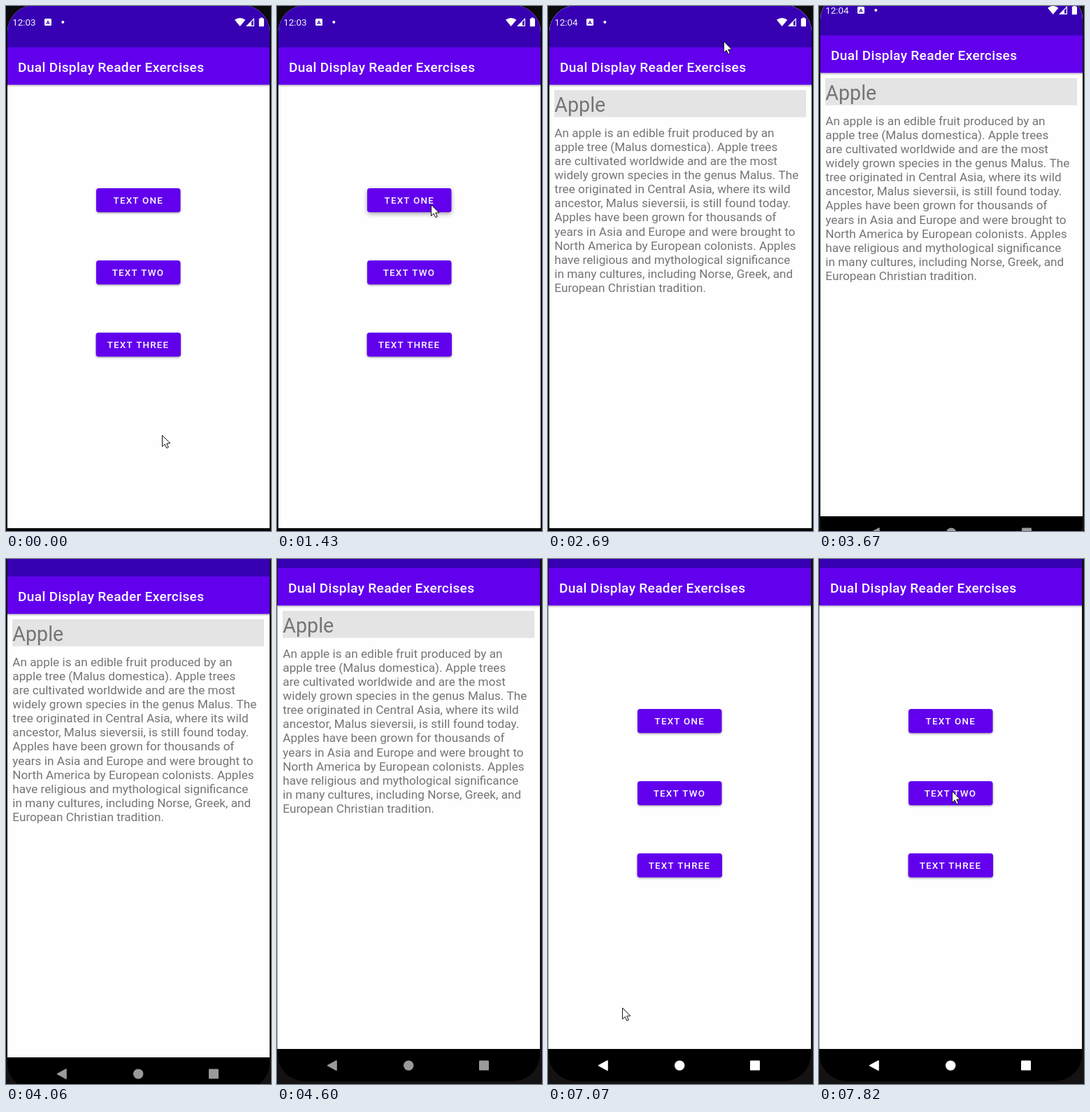
Write an HTML page with a canvas that moves like this. It is 379x749 px and loops after 8000 ms.

```html
<!DOCTYPE html>
<html lang="en">
<head>
<meta charset="utf-8">
<title>Two screens</title>
<style>
  html, body { margin: 0; width: 100%; height: 100%; overflow: hidden; background: #0b0a0c; }
  canvas { display: block; width: 379px; height: 749px; }
</style>
</head>
<body>
<canvas id="stage"></canvas>
<script>
const W = 379, H = 749, LOOP = 8000;
const canvas = document.getElementById('stage');
const dpr = window.devicePixelRatio || 1;
canvas.width = W * dpr;
canvas.height = H * dpr;
const ctx = canvas.getContext('2d');

const PURPLE = '#6200ee', DARK = '#3700b3', PAPER = '#fefefe', GREY = '#757575';
const SCREEN = { x: 2, y: -1, w: 375, h: 792, r: 38 };
const TITLE = 'Dual Display Reader Exercises';
const ARTICLE = [
  'An apple is an edible fruit produced by an',
  'apple tree (Malus domestica). Apple trees',
  'are cultivated worldwide and are the most',
  'widely grown species in the genus Malus. The',
  'tree originated in Central Asia, where its wild',
  'ancestor, Malus sieversii, is still found today.',
  'Apples have been grown for thousands of',
  'years in Asia and Europe and were brought to',
  'North America by European colonists. Apples',
  'have religious and mythological significance',
  'in many cultures, including Norse, Greek, and',
  'European Christian tradition.'
];
const BUTTONS = [
  { label: 'TEXT ONE', x: 129, y: 260, w: 120.5, textX: 153.6 },
  { label: 'TEXT TWO', x: 129, y: 363, w: 120.5, textX: 151.8 },
  { label: 'TEXT THREE', x: 128.6, y: 466, w: 121.4, textX: 144.8 }
];

// Each track holds [time, ...values]; values stay until the next entry.
const POINTER = [
  [0, 223, 612], [270, 218, 555], [400, 210, 420], [530, 214, 315], [660, 220, 283],
  [2280, 223, 262], [2410, 230, 205], [2540, 241, 125], [2690, 251, 50], [2810, 257, 8],
  [2930, -50, -50],
  [4880, 170, 738], [5010, 212, 610], [5140, 222, 504], [5270, 192, 560],
  [5400, 138, 655], [5530, 102, 715], [5660, 91, 731],
  [6920, 94, 712], [7070, 106, 640], [7220, 130, 530], [7370, 156, 420],
  [7520, 175, 345], [7670, 185, 311], [7820, 190, 331]
];
const SHIFT = [
  [0, 0, 0], [3380, 0, -4], [3516, 0, -10], [3652, 0, -17], [3788, 0, -24],
  [3924, 0, -30], [4060, 0, -34], [4330, 0, -38], [4465, -1, -43], [4600, -1, -46]
];
// opacity and scale of the article page
const PAGE = [
  [0, 0, 1], [2020, 0.5, 0.94], [2150, 1, 0.99], [2280, 1, 1],
  [6770, 0.6, 0.97], [6920, 0.15, 0.93], [7070, 0, 1]
];
// radius and opacity of the touch highlight, then button lift
const PRESS = [[0, 0, 0, 0], [1190, 45, 0.22, 0.5], [1310, 110, 0.14, 1], [1430, 0, 0, 1], [2280, 0, 0, 0]];
const NAV_TAP = [[0, 0], [6070, 0.2], [6270, 0.1], [6470, 0]];

function at(track, t) {
  let found = track[0];
  for (const key of track) if (key[0] <= t) found = key;
  return found.slice(1);
}

function rect(x, y, w, h, color) {
  ctx.fillStyle = color;
  ctx.fillRect(x, y, w, h);
}

function round(x, y, w, h, r) {
  ctx.beginPath();
  ctx.roundRect(x, y, w, h, r);
}

function poly(points, color) {
  ctx.beginPath();
  points.forEach(([x, y]) => ctx.lineTo(x, y));
  ctx.closePath();
  ctx.fillStyle = color;
  ctx.fill();
}

function disc(x, y, r, color) {
  ctx.beginPath();
  ctx.arc(x, y, r, 0, Math.PI * 2);
  ctx.fillStyle = color;
  ctx.fill();
}

function text(str, x, y, size, color, weight = 400, spacing = 0) {
  ctx.font = `${weight} ${size}px Roboto, sans-serif`;
  ctx.letterSpacing = spacing + 'px';
  ctx.fillStyle = color;
  ctx.fillText(str, x, y);
}

function drawBars() {
  rect(2, -1, 375, 747, PAPER);
  const shade = ctx.createLinearGradient(0, 112, 0, 116);
  shade.addColorStop(0, 'rgba(0,0,0,.26)');
  shade.addColorStop(1, 'rgba(0,0,0,0)');
  rect(2, 112, 375, 4, shade);
  rect(2, -1, 375, 60, DARK);
  rect(2, 59, 375, 53.4, PURPLE);
  text(TITLE, 17, 93.6, 19.1, '#fff', 500, 0.32);
}

function drawButton(b, press) {
  const [radius, alpha, lift] = press;
  ctx.save();
  ctx.shadowColor = 'rgba(0,0,0,.36)';
  ctx.shadowBlur = (3 + 3 * lift) * dpr;
  ctx.shadowOffsetY = (1.3 + lift) * dpr;
  round(b.x, b.y, b.w, 34.3, 3.8);
  ctx.fillStyle = PURPLE;
  ctx.fill();
  ctx.restore();
  if (alpha) {
    ctx.save();
    round(b.x, b.y, b.w, 34.3, 3.8);
    ctx.clip();
    disc(220, 283, radius, `rgba(255,255,255,${alpha})`);
    ctx.restore();
  }
  text(b.label, b.textX, b.y + 22, 13.37, '#fff', 500, 1.19);
}

function drawHome(t) {
  drawBars();
  BUTTONS.forEach((b, i) => drawButton(b, i ? [0, 0, 0] : at(PRESS, t)));
}

function drawArticle() {
  drawBars();
  rect(9, 120, 360, 38.6, '#e4e4e4');
  text('Apple', 9.3, 150.6, 28.65, GREY);
  ARTICLE.forEach((line, i) => text(line, 9.3, 186.6 + i * 20.14, 17.19, GREY));
}

function drawStatus(t) {
  text(t < 2280 ? '12:03' : '12:04', 9.3, 28.2, 13.4, '#f4f0fb');
  round(55, 18, 10, 10, 1.5);
  ctx.fillStyle = '#fff';
  ctx.fill();
  text('A', 57.2, 26, 8, DARK, 700);
  disc(81.3, 23, 2, '#fff');

  ctx.beginPath();
  ctx.moveTo(334.7, 29);
  ctx.lineTo(327, 19.8);
  ctx.quadraticCurveTo(334.7, 14, 342.4, 19.8);
  ctx.closePath();
  ctx.fillStyle = '#fff';
  ctx.fill();

  poly([[343, 29], [355, 29], [355, 17]], '#fff');
  poly([[351, 27.8], [351, 22.8], [353.8, 20], [353.8, 27.8]], DARK);

  rect(363.7, 16.6, 3.4, 2, '#fff');
  round(361.8, 17.8, 7.2, 11.4, 1);
  ctx.fillStyle = '#fff';
  ctx.fill();
}

function drawNav(t) {
  const color = t < 6070 ? '#9a9a9a' : '#fff';
  rect(2, 745, 375, 47, '#000');
  const [tap] = at(NAV_TAP, t);
  if (tap) {
    ctx.beginPath();
    ctx.ellipse(80, 768.5, 33, 23, 0, 0, Math.PI * 2);
    ctx.fillStyle = `rgba(255,255,255,${tap})`;
    ctx.fill();
  }
  poly([[73.5, 768.6], [86, 762], [86, 775.2]], color);
  ctx.strokeStyle = color;
  ctx.lineWidth = 1.6;
  ctx.lineJoin = 'round';
  ctx.stroke();
  disc(189.2, 768.6, 7.2, color);
  round(290, 761.6, 14, 14, 1.2);
  ctx.fillStyle = color;
  ctx.fill();
}

function drawPhone(t) {
  const [dx, dy] = at(SHIFT, t);
  ctx.save();
  ctx.translate(dx, dy);
  if (dx < 0) rect(1, 112, 1, 633, '#a0a0a0');
  round(SCREEN.x, SCREEN.y, SCREEN.w, SCREEN.h, SCREEN.r);
  ctx.clip();

  drawHome(t);
  const [alpha, scale] = at(PAGE, t);
  if (alpha) {
    ctx.save();
    ctx.globalAlpha = alpha;
    ctx.translate(189.5, 395);
    ctx.scale(scale, scale);
    ctx.translate(-189.5, -395);
    drawArticle();
    ctx.restore();
  }
  drawStatus(t);
  drawNav(t);
  ctx.restore();
}

function drawPointer(t) {
  const [x, y] = at(POINTER, t);
  ctx.save();
  ctx.translate(x + 0.5, y + 0.5);
  poly([[0, 0], [0, 16], [3.7, 12.6], [6.3, 18.2], [8.8, 17.1], [6.3, 11.6], [11.3, 11.4]], '#fff');
  ctx.strokeStyle = '#111';
  ctx.lineWidth = 1;
  ctx.lineJoin = 'miter';
  ctx.stroke();
  ctx.restore();
}

const start = performance.now();

function frame() {
  const t = (performance.now() - start) % LOOP;
  ctx.setTransform(dpr, 0, 0, dpr, 0, 0);
  rect(0, 0, W, H, t < 3380 ? '#0b0a0c' : '#151214');
  drawPhone(t);
  drawPointer(t);
  requestAnimationFrame(frame);
}
frame();
</script>
</body>
</html>
```
